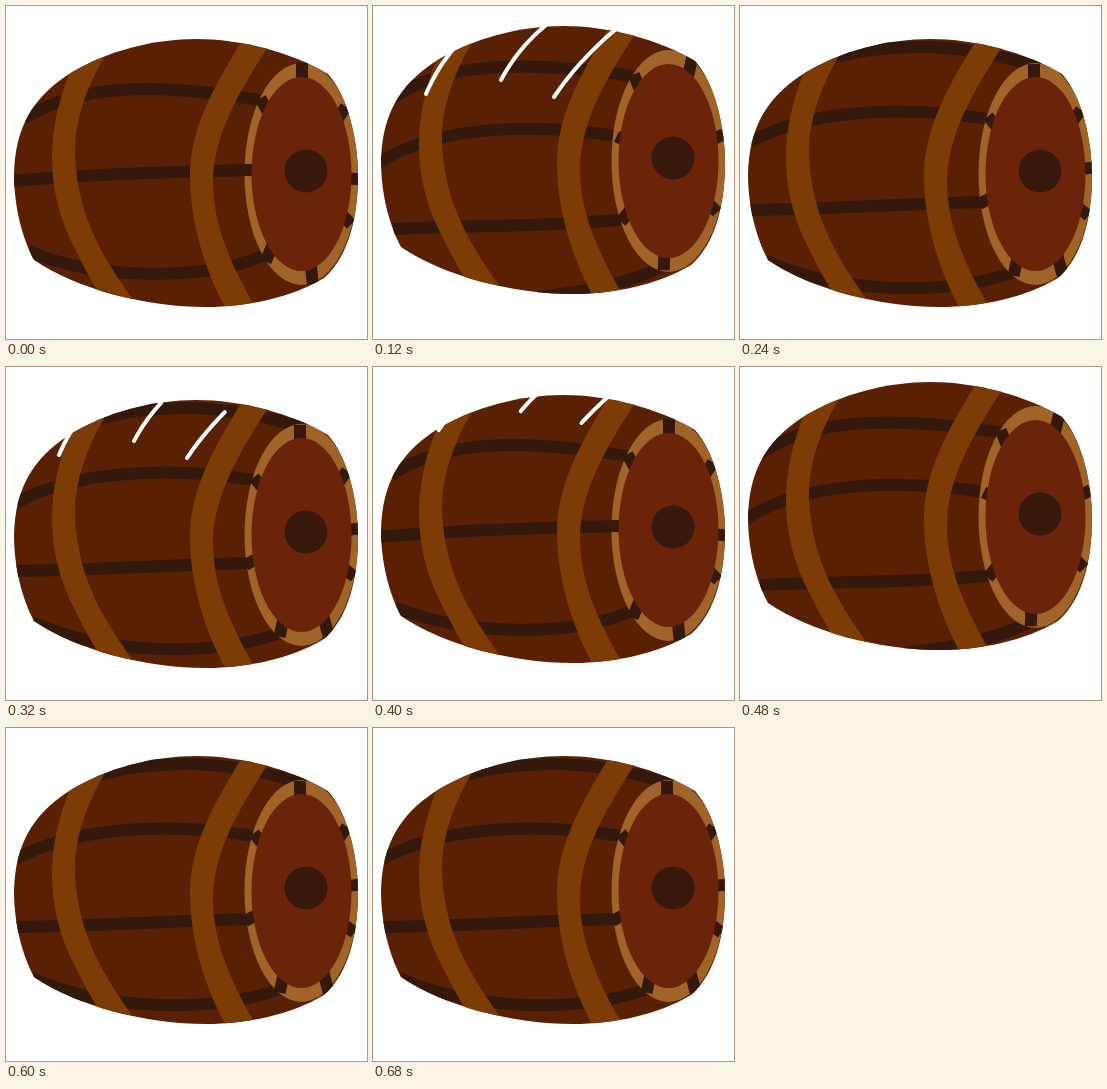
These frames come from a looping animation (361x333 px, 0.72 s). An HTML page with a canvas:

```html
<!DOCTYPE html>
<html lang="en">
<head>
<meta charset="utf-8">
<title>Rolling barrel</title>
<style>
  html, body { margin: 0; width: 100%; height: 100%; overflow: hidden; background: #fff; }
  canvas { display: block; width: 361px; height: 333px; }
</style>
</head>
<body>
<canvas id="stage" width="361" height="333"></canvas>
<script>
const ctx = document.getElementById('stage').getContext('2d');
const STEP = 40, STEPS = 18;
const COLOR = {
  wood: '#592003', hoop: '#7d3b06', seam: '#34180b',
  rim: '#a06428', lid: '#6b240a', badge: '#38180a'
};

const hull = new Path2D('M8 168C9 120 28 92 60 70C100 44 150 33 190 33C235 33 285 46 322 68' +
  'C342 90 352 135 352 170C352 210 343 250 318 272C285 292 240 301 200 301' +
  'C140 301 70 283 28 254C16 232 8 200 8 168Z');
const hoops = new Path2D('M64 66C40 125 38 185 70 245Q82 270 95 290L130 298C100 255 72 215 69 150' +
  'C68 120 78 85 99 50L80 40Z' +
  'M237 33C205 85 184 125 184 170C184 215 198 262 220 303L248 299C225 258 207 220 207 175' +
  'C208 130 230 90 264 38Z');

// Three poses of the rolling staves: lift, seams along the side, seam marks on the rim.
const poses = [
  { lift: 0,
    seams: 'M18 113C70 78 150 76 258 95M6 175C60 170 150 166 246 164M22 245C90 274 200 276 264 247',
    marks: [[296, 64], [257, 97], [242, 164], [262, 250], [306, 271], [342, 215], [349, 173], [337, 105]] },
  { lift: -8,
    seams: 'M20 105C70 70 150 66 264 84M6 170C60 135 150 128 250 144' +
           'M20 236C100 232 180 234 256 226M165 304C215 299 255 290 288 274',
    marks: [[263, 87], [247, 145], [251, 225], [291, 270], [318, 70], [347, 143], [341, 216]] },
  { lift: 0,
    seams: 'M92 52C150 37 220 35 300 62M10 136C60 108 150 96 254 114' +
           'M10 204C90 203 160 198 248 196M26 255C90 284 200 294 280 264',
    marks: [[294, 65], [251, 114], [243, 196], [275, 263], [321, 263], [345, 207], [338, 108], [349, 162]] }
].map(p => ({ ...p, seams: new Path2D(p.seams) }));

// Rattle of the whole barrel, one value per step.
const rattle = [0, -5, 0, -5, 0, -5, 0, -5, 0, -5, -5, -5, -10, -5, 0, -5, 0, -5];

// Speed lines: start, control, end.
const streaks = [
  [53, 88, 64, 62, 82, 41],
  [128, 74, 145, 42, 173, 19],
  [181, 91, 205, 55, 243, 23]
];
const sweep = [null, [0, .33], [0, .66], [0, 1], [.5, 1], [.93, 1]];

function ellipse(rx, ry, color) {
  ctx.beginPath();
  ctx.ellipse(295.5, 168, rx, ry, 0, 0, Math.PI * 2);
  ctx.fillStyle = color;
  ctx.fill();
}

function mark([x, y]) {
  const dx = x - 295.5, dy = y - 168;
  ctx.beginPath();
  ctx.moveTo(295.5 + dx * .86, 168 + dy * .86);
  ctx.lineTo(295.5 + dx * 1.07, 168 + dy * 1.07);
  ctx.stroke();
}

function streak([x0, y0, x1, y1, x2, y2], from, to) {
  const at = (a, b, c, t) => (1 - t) ** 2 * a + 2 * t * (1 - t) * b + t * t * c;
  ctx.beginPath();
  for (let i = 0; i <= 16; i++) {
    const t = from + (to - from) * i / 16;
    ctx.lineTo(at(x0, x1, x2, t), at(y0, y1, y2, t));
  }
  ctx.stroke();
}

function drawBarrel(pose, y) {
  ctx.save();
  ctx.translate(0, y);
  ctx.clip(hull);
  ctx.fillStyle = COLOR.wood;
  ctx.fillRect(0, 0, 361, 333);
  ctx.strokeStyle = COLOR.seam;
  ctx.lineCap = 'butt';
  ctx.lineWidth = 12;
  ctx.stroke(pose.seams);
  ctx.fillStyle = COLOR.hoop;
  ctx.fill(hoops);
  ellipse(57, 111, COLOR.rim);
  pose.marks.forEach(mark);
  ellipse(50, 97, COLOR.lid);
  ctx.beginPath();
  ctx.arc(300, 165, 21.5, 0, Math.PI * 2);
  ctx.fillStyle = COLOR.badge;
  ctx.fill();
  ctx.restore();
}

function draw(step) {
  const pose = poses[Math.floor(step / 3) % 3];
  ctx.fillStyle = '#fff';
  ctx.fillRect(0, 0, 361, 333);
  drawBarrel(pose, pose.lift + rattle[step]);
  const span = step < 12 && sweep[step % 6];
  if (span) {
    ctx.strokeStyle = '#fff';
    ctx.lineWidth = 4;
    ctx.lineCap = 'round';
    streaks.forEach(s => streak(s, ...span));
  }
}

const start = performance.now();
function tick() {
  draw(Math.floor((performance.now() - start) / STEP) % STEPS);
  requestAnimationFrame(tick);
}
tick();
</script>
</body>
</html>
```
